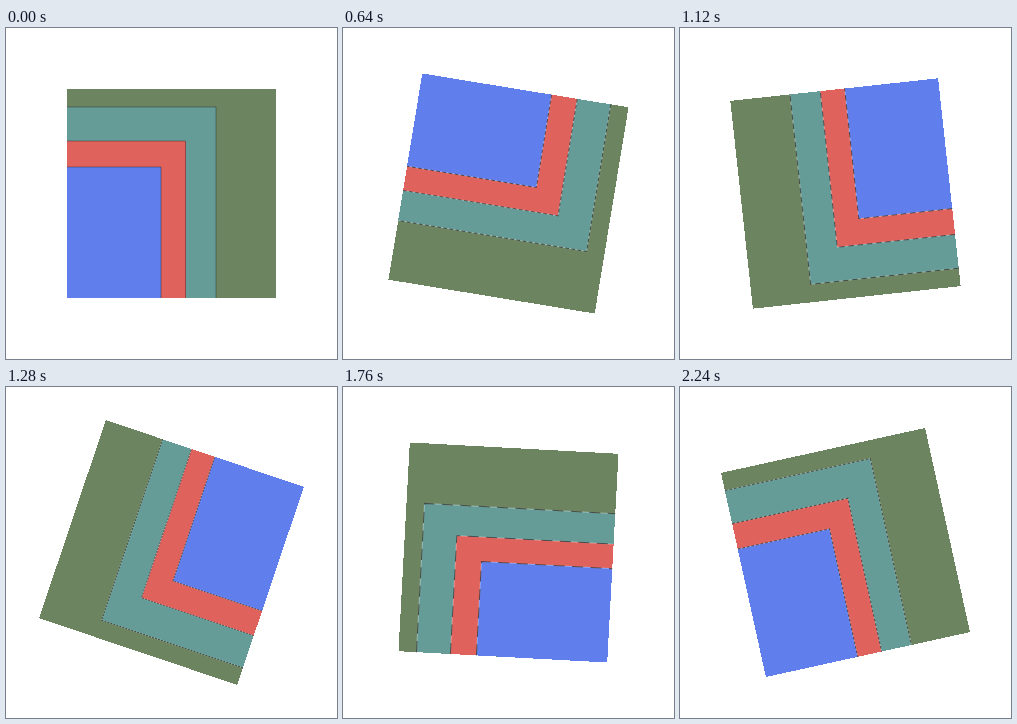
An HTML page for the animation above (2.32 s loop, 331 by 331 pixels).

```html
<!DOCTYPE html>
<html lang="en">
<head>
<meta charset="utf-8">
<title>Turning squares</title>
<style>
  html, body { margin: 0; width: 100%; height: 100%; overflow: hidden; background: #fff; }
  svg { display: block; width: 331px; height: 331px; }
  rect { shape-rendering: crispEdges; }
  path { fill: none; }
  .pale { stroke: #fff; stroke-width: .8; }
  .dark { stroke: #222; stroke-width: 1; }
</style>
</head>
<body>
<svg viewBox="0 0 331 331"><g id="stack"></g></svg>
<script>
const STEPS = 29, STEP_MS = 80, CENTER = 165.5;
const LEFT = 61, BOTTOM = 270;
const layers = [
  { w: 209, h: 209, fill: '#6c8560' },
  { w: 149, h: 191, fill: '#659c98' },
  { w: 118.5, h: 157, fill: '#df625d' },
  { w: 94, h: 131, fill: '#607fed' }
];
const stack = document.getElementById('stack');

function add(tag, attrs) {
  const el = document.createElementNS('http://www.w3.org/2000/svg', tag);
  for (const key in attrs) el.setAttribute(key, attrs[key]);
  stack.append(el);
  return el;
}

layers.forEach(({ w, h, fill }, i) => {
  const top = BOTTOM - h;
  add('rect', { x: LEFT, y: top, width: w, height: h, fill });
  if (!i) return;
  const d = `M${LEFT} ${top}h${w}v${h}`;
  add('path', { d, class: 'pale' });
  add('path', { d, class: 'dark' });
});

const pale = stack.querySelectorAll('.pale');
const dark = stack.querySelectorAll('.dark');

// Seam dashes follow the stair-step spacing of a slanted pixel edge.
function dashPeriod(angle) {
  const quarter = angle % 90;
  const tilt = Math.min(quarter, 90 - quarter) * Math.PI / 180;
  const slope = Math.tan(tilt);
  return 1 / (Math.min(slope, 1 - slope) * Math.cos(tilt));
}

let shown = -1;
function draw() {
  const step = Math.floor(performance.now() / STEP_MS) % STEPS;
  if (step !== shown) {
    shown = step;
    const angle = step * 360 / STEPS;
    const period = step ? dashPeriod(angle) : 0;
    stack.setAttribute('transform', `rotate(${angle} ${CENTER} ${CENTER})`);
    pale.forEach(p => p.style.opacity = step ? .4 : 0);
    dark.forEach(p => {
      p.style.opacity = step ? .7 : .4;
      p.style.strokeDasharray = step ? `${period * .6} ${period * .4}` : 'none';
    });
  }
  requestAnimationFrame(draw);
}
draw();
</script>
</body>
</html>
```
